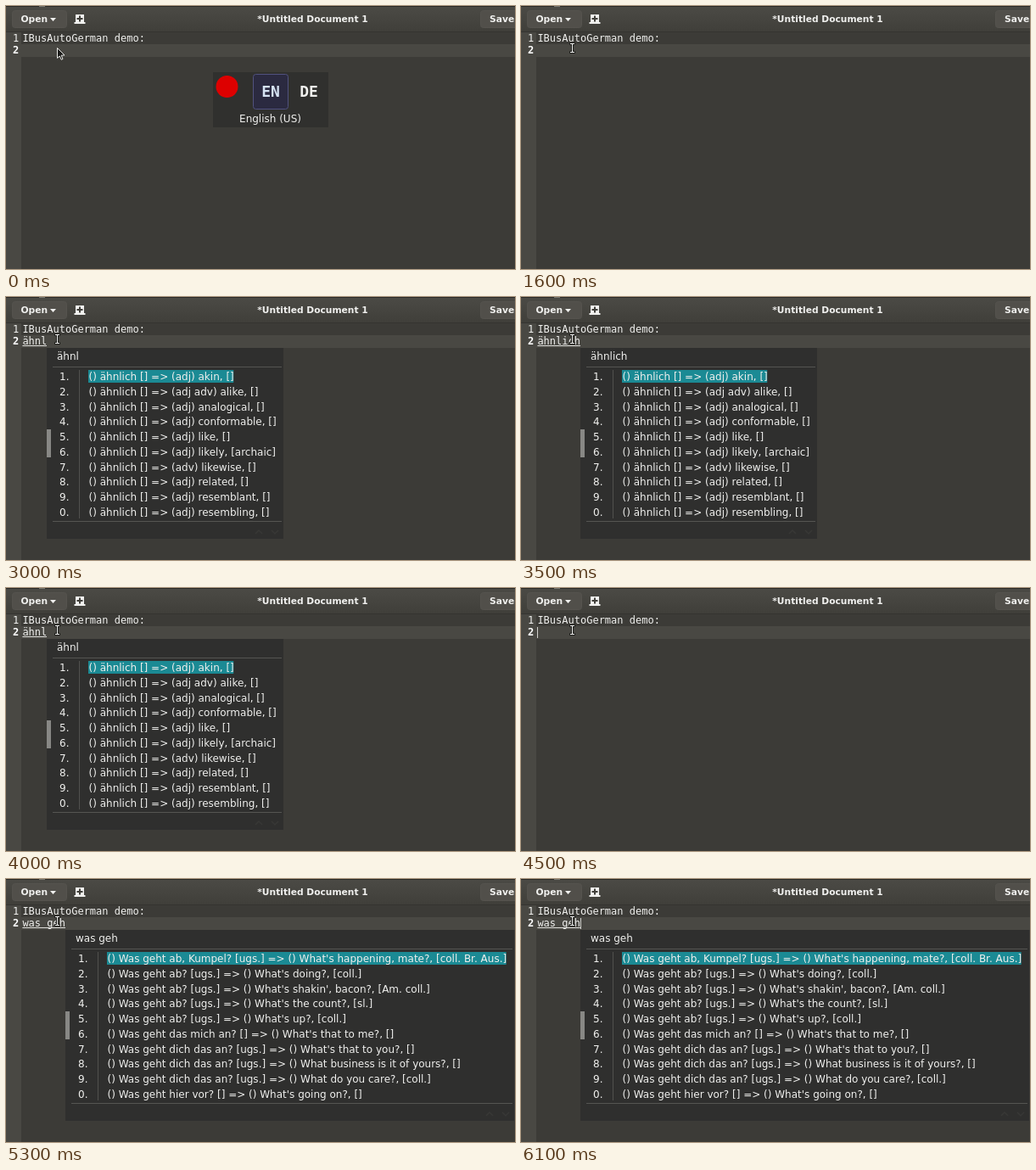
Recreate the animation shown at these times as an HTML page with a canvas. Size 600 by 310 pixels, loop 6200 ms.

```html
<!DOCTYPE html>
<html lang="en">
<head>
<meta charset="utf-8">
<title>Text editor demo</title>
<style>
html, body { margin: 0; width: 100%; height: 100%; overflow: hidden; background: #3c3b37; }
canvas { display: block; }
</style>
</head>
<body>
<canvas id="stage" width="600" height="310"></canvas>
<script>
const ctx = document.getElementById('stage').getContext('2d');
const LOOP = 6200;
const SANS = '12px "DejaVu Sans", sans-serif';
const BOLD = 'bold 10.7px "DejaVu Sans", sans-serif';
const MONO = '12px "DejaVu Sans Mono", monospace';
const CHAR = 7.224;
const TEXT_X = 19.4;

// Each entry: start time and the text being composed from then on.
const typing = [
  [0, ''], [2400, 'ä'], [2600, 'äh'], [2800, 'ähn'], [3000, 'ähnl'],
  [3200, 'ähnli'], [3300, 'ähnlic'], [3400, 'ähnlich'],
  [3800, 'ähnlic'], [3900, 'ähnli'], [4000, 'ähnl'],
  [4100, 'ähn'], [4200, 'äh'], [4300, 'ä'], [4500, ''],
  [4700, 'w'], [4800, 'wa'], [4900, 'was'], [5000, 'was '],
  [5100, 'was g'], [5200, 'was ge'], [5300, 'was geh']
];

const cursorOn = [[1300, 1600], [2000, 2400], [4500, 4700], [5400, 5700], [6100, LOOP]];
const sources = [[0, 1, 'English (US)'], [300, 2, 'German'], [800, 0, 'IBusAutoGerman']];

const similar = ['akin', 'alike', 'analogical', 'conformable', 'like', 'likely',
  'likewise', 'related', 'resemblant', 'resembling'].map(word => {
  const kind = { alike: 'adj adv', likewise: 'adv' }[word] || 'adj';
  return `() ähnlich [] => (${kind}) ${word}, [${word === 'likely' ? 'archaic' : ''}]`;
});

const pairs = list => list.map(([german, english]) => `() ${german} [] => () ${english}, []`);

const resemble = pairs([
  ['ähneln', 'to resemble'], ['ähneln', 'to be similar to'], ['ähnelnd', 'resembling'],
  ['ähnelte', 'resembled'], ['ähnlich', 'akin'], ['ähnlich', 'alike'],
  ['ähnlich sein', 'to be alike'], ['ähnlich wie', 'similar to'],
  ['Ähnlichkeit', 'similarity'], ['Ähnlichkeit', 'resemblance']
]);

const umlaut = pairs([
  ['Ä, ä (Umlaut des Buchstabens A)', 'Ä, ä (umlaut of the letter A)'],
  ['Ächtung', 'ostracism'], ['ächzen', 'to groan'], ['ähneln', 'to resemble'],
  ['ähnlich', 'similar'], ['Ähre', 'ear of grain'], ['älter', 'older'],
  ['ändern', 'to change'], ['ängstlich', 'anxious'], ['äußern', 'to express']
]);

const what = pairs([
  ['was auch immer geschehen mag', 'whatever may happen'], ['was', 'what'],
  ['was für ein', 'what kind of'], ['was mich betrifft', 'as for me'],
  ['was noch', 'what else'], ['waschen', 'to wash'], ['Wasser', 'water'],
  ['wasserdicht', 'waterproof'], ['wässrig', 'watery'], ['Wasserfall', 'waterfall']
]);

const going = [
  "ab, Kumpel? [ugs.] => () What's happening, mate?, [coll. Br. Aus.]",
  "ab? [ugs.] => () What's doing?, [coll.]",
  "ab? [ugs.] => () What's shakin', bacon?, [Am. coll.]",
  "ab? [ugs.] => () What's the count?, [sl.]",
  "ab? [ugs.] => () What's up?, [coll.]",
  "das mich an? [] => () What's that to me?, []",
  "dich das an? [ugs.] => () What's that to you?, []",
  "dich das an? [ugs.] => () What business is it of yours?, []",
  "dich das an? [ugs.] => () What do you care?, [coll.]",
  "hier vor? [] => () What's going on?, []"
].map(rest => '() Was geht ' + rest);

function candidates(word) {
  if (word.startsWith('was g')) return going;
  if (word.startsWith('w')) return what;
  if (word.startsWith('ähnl')) return similar;
  return word === 'ähn' ? resemble : umlaut;
}

const current = (steps, t) => steps.filter(step => step[0] <= t).pop();
const wordEnd = word => Math.round(TEXT_X + word.length * CHAR);

function rect(x, y, w, h, color) {
  ctx.fillStyle = color;
  ctx.fillRect(x, y, w, h);
}

function roundRect(x, y, w, h, r, fill, stroke) {
  ctx.beginPath();
  ctx.roundRect(x, y, w, h, r);
  ctx.fillStyle = fill;
  ctx.fill();
  if (stroke) {
    ctx.strokeStyle = stroke;
    ctx.lineWidth = 1;
    ctx.stroke();
  }
}

function text(str, x, y, font, color = '#f0f0ee', align = 'left') {
  ctx.font = font;
  ctx.fillStyle = color;
  ctx.textAlign = align;
  ctx.fillText(str, x, y);
}

function polygon(points, fill, stroke) {
  ctx.beginPath();
  points.forEach(([x, y]) => ctx.lineTo(x, y));
  ctx.closePath();
  ctx.fillStyle = fill;
  ctx.fill();
  if (stroke) {
    ctx.strokeStyle = stroke;
    ctx.lineWidth = 1;
    ctx.stroke();
  }
}

function drawNewTabIcon() {
  rect(82, 10, 10, 9, '#f0f0ee');
  rect(80.5, 19, 13, 2, '#f0f0ee');
  rect(83.5, 14, 7, 2, '#403f3a');
  rect(86, 11.5, 2, 7, '#403f3a');
}

function drawHeader() {
  const shade = ctx.createLinearGradient(0, 1, 0, 30);
  shade.addColorStop(0, '#4b4a45');
  shade.addColorStop(1, '#403f3a');
  rect(0, 0, 600, 31, shade);
  rect(0, 0, 600, 1, '#2b2a27');
  rect(39, 0, 7, 1, '#77766f');
  rect(0, 30, 600, 1, '#353430');
  roundRect(7.5, 5.5, 64, 20, 3, '#514f4a', '#55534e');
  roundRect(559.5, 5.5, 60, 20, 3, '#514f4a', '#55534e');
  text('Open', 17.5, 19, BOLD);
  text('*Untitled Document 1', 361.5, 19, BOLD, '#f0f0ee', 'center');
  text('Save', 570, 19, BOLD);
  polygon([[52, 14], [59, 14], [55.5, 18]], '#f0f0ee');
  drawNewTabIcon();
}

function drawEditor(word, cursor) {
  rect(0, 31, 600, 279, '#3c3b37');
  rect(0, 31, 18, 279, '#494843');
  rect(18, 45, 582, 15, '#494843');
  text('1', 8, 42, MONO);
  text('2', 8, 56, 'bold ' + MONO, '#ffffff');
  text('IBusAutoGerman demo:', TEXT_X, 42, MONO);
  text(word, TEXT_X, 56, MONO);
  const end = wordEnd(word);
  if (word) rect(TEXT_X, 57, end - TEXT_X, 1, '#e0e0dc');
  if (cursor) rect(end, 46, 1, 13, '#d0d0cc');
}

function drawSwitcher(t) {
  const alpha = Math.min(1, (1400 - t) / 200);
  if (alpha <= 0) return;
  const [, selected, label] = current(sources, t);
  ctx.globalAlpha = alpha;
  rect(244, 78, 136, 65, '#30302e');
  roundRect(246.5 + selected * 45, 80.5, 41, 41, 3, '#2b2a40', '#51527f');
  ctx.beginPath();
  ctx.arc(260.5, 95, 13, 0, Math.PI * 2);
  ctx.fillStyle = '#dd0000';
  ctx.fill();
  const font = 'bold 18px "DejaVu Sans Mono", monospace';
  text('EN', 312, 107, font, selected === 1 ? '#d5e2f2' : '#f0f0ee', 'center');
  text('DE', 357, 107, font, selected === 2 ? '#d5e2f2' : '#f0f0ee', 'center');
  text(label, 311.5, 137, SANS, '#f0f0ee', 'center');
  ctx.globalAlpha = 1;
}

function drawArrows(right) {
  ctx.strokeStyle = '#383836';
  ctx.lineWidth = 1.5;
  for (const [x, dir] of [[right - 29, -1], [right - 10, 1]]) {
    ctx.beginPath();
    ctx.moveTo(x - 4, 277 - dir * 2);
    ctx.lineTo(x, 277 + dir * 2);
    ctx.lineTo(x + 4, 277 - dir * 2);
    ctx.stroke();
  }
}

function drawCandidates(word) {
  const rows = candidates(word);
  ctx.font = SANS;
  const widths = rows.map(row => ctx.measureText(row).width);
  const left = wordEnd(word);
  const right = Math.round(left + 58 + Math.max(...widths));
  rect(left, 60, right - left, 225, '#2f2f2e');
  rect(left + 7, 82, right - left - 9, 1, '#555552');
  rect(left + 7, 264, right - left - 9, 1, '#555552');
  rect(left + 38, 86, 1, 175, '#51514e');
  rect(left, 156, 5, 33, '#888885');
  text(word, left + 12, 74, SANS);
  rect(left + 49, 86, widths[0], 15, '#1b8a94');
  rows.forEach((row, i) => {
    const y = Math.round(98 + i * 17.78);
    text(`${(i + 1) % 10}.`, left + 15, y, SANS);
    text(row, left + 49.5, y, SANS);
  });
  drawArrows(right);
}

function drawArrowPointer() {
  polygon([[60.5, 49.5], [60.5, 61.5], [63.2, 59], [65.2, 63.3], [67, 62.4],
    [65.2, 58.2], [69, 58]], '#1c1c1a', '#e8e8e5');
}

function drawBeamPointer() {
  for (const [grow, color] of [[1, '#22221f'], [0, '#f0f0ee']]) {
    const bar = (x, y, w, h) => rect(x - grow, y - grow, w + 2 * grow, h + 2 * grow, color);
    bar(58, 44, 5, 1);
    bar(60, 44, 1, 11);
    bar(58, 54, 5, 1);
  }
}

function draw(t) {
  const word = current(typing, t)[1];
  drawHeader();
  drawEditor(word, cursorOn.some(([from, to]) => t >= from && t < to));
  drawSwitcher(t);
  if (word) drawCandidates(word);
  if (t < 1300) drawArrowPointer();
  else drawBeamPointer();
}

const start = performance.now();
function tick() {
  const elapsed = (performance.now() - start) % LOOP;
  draw(Math.floor(elapsed / 100) * 100);
  requestAnimationFrame(tick);
}
tick();
</script>
</body>
</html>
```
